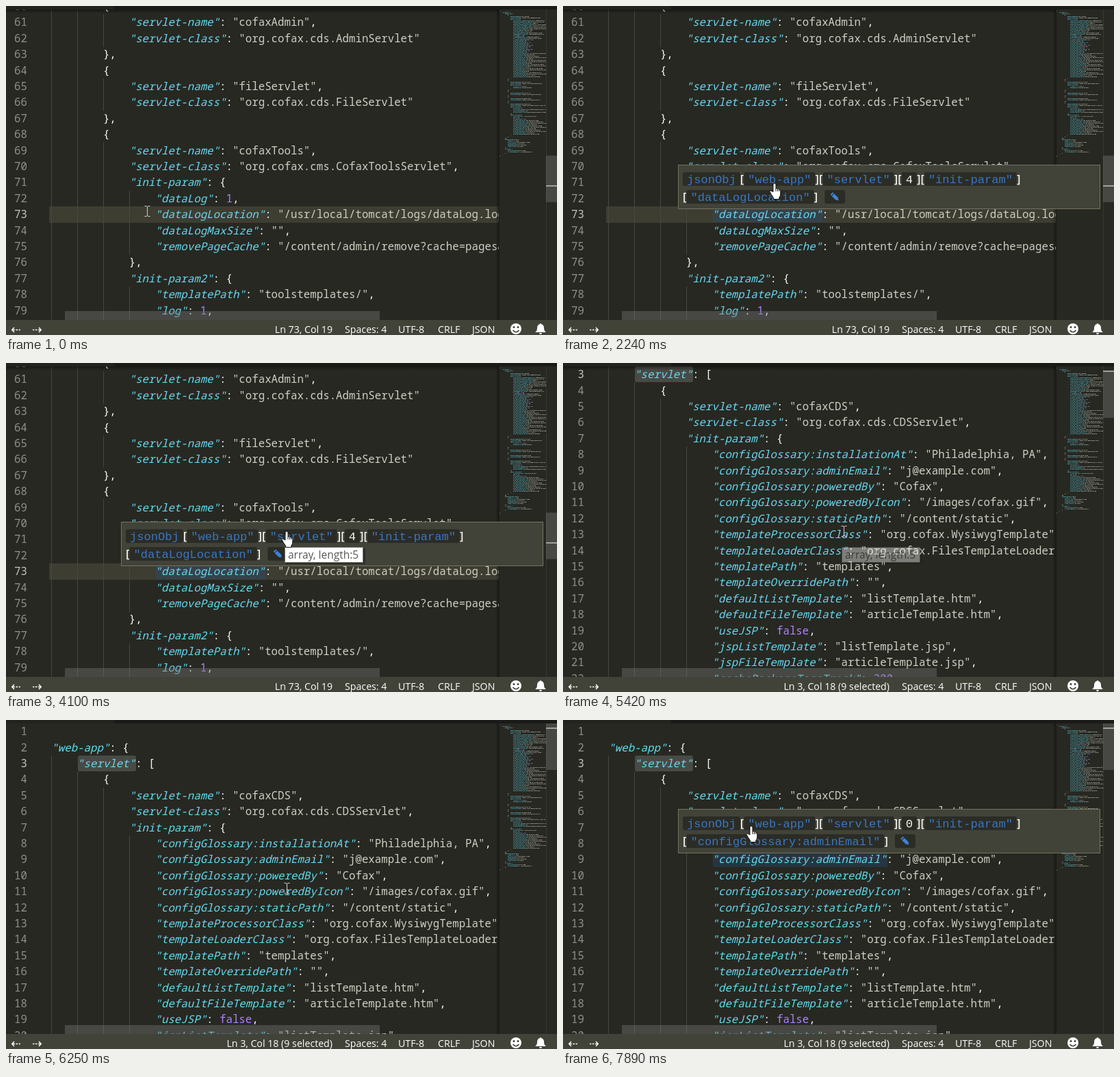
Recreate the animation shown at these times as an HTML page with a canvas. Size 805x481 px, loop 8 s.

```html
<!DOCTYPE html>
<html lang="en">
<head>
<meta charset="utf-8">
<title>JSON path hover</title>
<style>
html, body { margin: 0; width: 100%; height: 100%; overflow: hidden; background: #272822; }
canvas { display: block; }
</style>
</head>
<body>
<canvas id="stage" width="805" height="481"></canvas>
<script>
const stage = document.getElementById('stage').getContext('2d');
const layer = Object.assign(document.createElement('canvas'), { width: 805, height: 481 }).getContext('2d');
let ctx = stage;
const LOOP = 8000, CHAR = 9.45, ROW = 23.4, TOP = 5, BOTTOM = 459, LEFT = 28.5;
const MONO = '500 15.75px "Noto Sans Mono", monospace';
const UI = '"Open Sans", sans-serif';
const CODE = '17.1px "Liberation Mono", monospace';
const COLORS = { key: '#66d9ef', string: '#cfcfc2', number: '#ae81ff', mark: '#f8f8f2' };

// Each line starts with its indent level.
const head = `0{
1"web-app": {
2"servlet": [
3{
4"servlet-name": "cofaxCDS",
4"servlet-class": "org.cofax.cds.CDSServlet",
4"init-param": {
5"configGlossary:installationAt": "Philadelphia, PA",
5"configGlossary:adminEmail": "j@example.com",
5"configGlossary:poweredBy": "Cofax",
5"configGlossary:poweredByIcon": "/images/cofax.gif",
5"configGlossary:staticPath": "/content/static",
5"templateProcessorClass": "org.cofax.WysiwygTemplate",
5"templateLoaderClass": "org.cofax.FilesTemplateLoader",
5"templatePath": "templates",
5"templateOverridePath": "",
5"defaultListTemplate": "listTemplate.htm",
5"defaultFileTemplate": "articleTemplate.htm",
5"useJSP": false,
5"jspListTemplate": "listTemplate.jsp",
5"jspFileTemplate": "articleTemplate.jsp",
5"cachePackageTagsTrack": 200,`.split('\n');
const middle = `4}
3},
3{
4"servlet-name": "cofaxEmail",
4"servlet-class": "org.cofax.cds.EmailServlet",
4"init-param": {
5"mailHost": "mail1",
5"mailHostOverride": "mail2"
4}
3},
3{
4"servlet-name": "cofaxAdmin",
4"servlet-class": "org.cofax.cds.AdminServlet"
3},
3{
4"servlet-name": "fileServlet",
4"servlet-class": "org.cofax.cds.FileServlet"
3},
3{
4"servlet-name": "cofaxTools",
4"servlet-class": "org.cofax.cms.CofaxToolsServlet",
4"init-param": {
5"dataLog": 1,
5"dataLogLocation": "/usr/local/tomcat/logs/dataLog.log",
5"dataLogMaxSize": "",
5"removePageCache": "/content/admin/remove?cache=pages&id=",
4},
4"init-param2": {
5"templatePath": "toolstemplates/",
5"log": 1,`.split('\n');
const tail = `4}
3}
2],
2"servlet-mapping": {
3"cofaxCDS": "/",
3"cofaxEmail": "/aliases/mail/*",
3"cofaxAdmin": "/admin/*",
3"fileServlet": "/static/*",
3"cofaxTools": "/tools/*"
2},
2"taglib": {
3"taglib-uri": "cofax.tld",
3"taglib-location": "/tags/cofax.tld"
2}
1}
0}`.split('\n');
// Parameters that are only ever seen in the minimap.
const params = (count, plain) => Array.from({ length: count }, (_, i) =>
  `5"${'k'.repeat(12 + i * 7 % 11)}": ${i < plain ? 10 + i : `"${'v'.repeat(i * 11 % 34)}"`},`);
const lines = [...head, ...params(27, 9), ...middle, ...params(12, 1), ...tail].map(parse);

function parse(source) {
  let col = source[0] * 4;
  const line = { indent: +source[0], tokens: [] };
  for (const text of source.slice(1).match(/"[^"]*"|\w+|[^"\w]+/g)) {
    const next = source[1 + col - line.indent * 4 + text.length];
    const kind = text[0] === '"' ? (next === ':' ? 'key' : 'string') : /\w/.test(text) ? 'number' : 'mark';
    line.tokens.push({ text, col, kind });
    col += text.length;
  }
  return line;
}

const minimap = document.createElement('canvas');
minimap.width = 68;
minimap.height = 230;
{
  const m = minimap.getContext('2d');
  lines.forEach((line, i) => line.tokens.forEach(({ text, col, kind }) => {
    m.fillStyle = COLORS[kind];
    [...text].forEach((c, k) => {
      if (c === ' ') return;
      m.globalAlpha = 0.2 + (c.charCodeAt(0) * 7 + k * 13 + i * 5) % 10 * 0.05;
      m.fillRect(col + k, i * 2, 1, 1);
    });
  }));
}

const views = [
  { from: 0, scroll: 1396.7, line: 73, status: 'Ln 73, Col 19' },
  { from: 5420, scroll: 46.8, line: 3, status: 'Ln 3, Col 18 (9 selected)' },
  { from: 6250, scroll: 0, line: 3, status: 'Ln 3, Col 18 (9 selected)' }
];
const hovers = [
  { from: 1370, full: 1490, to: 5420, y: 232, line: 73, index: '4', key: '"dataLogLocation"' },
  { from: 5970, full: 5970, to: 6250, y: 177, line: 13, index: '0', key: '"templateProcessorClass"' },
  { from: 7260, full: 7390, to: 8000, y: 130, line: 9, index: '0', key: '"configGlossary:adminEmail"' }
];
const tips = [
  { x: 309, y: 277, w: 122, text: 'object, length:3', fade: [[2730, .35], [2860, .8], [2980, 1], [3490, .6], [3610, .3], [3730, 0]] },
  { x: 407, y: 269, w: 115, text: 'array, length:5', fade: [[3980, .4], [4100, 1], [5280, .75], [5420, .4], [5550, 0]] }
];
// time, x, y, 1 for the hand
const mouse = [
  [0, 206, 300], [260, 208, 300], [380, 216, 300], [500, 232, 300], [630, 252, 301], [750, 270, 301],
  [870, 284, 301], [1000, 288, 301], [1860, 289, 301], [2000, 298, 285, 1], [2120, 305, 271, 1],
  [2240, 309, 259, 1], [2360, 311, 255, 1], [2480, 311, 253, 1], [3230, 307, 251, 1], [3350, 332, 251, 1],
  [3490, 372, 249, 1], [3610, 402, 247, 1], [3730, 410, 246, 1], [5420, 410, 246], [6760, 396, 242],
  [6880, 340, 222], [7000, 320, 216], [7890, 275, 155, 1]
];
const last = (list, t) => list.filter(step => step[0] <= t).pop();

function rect(x, y, w, h, color, radius = 0) {
  ctx.fillStyle = color;
  ctx.beginPath();
  ctx.roundRect(x, y, w, h, radius);
  ctx.fill();
}
function write(text, x, y, color, font, align = 'left') {
  ctx.font = font;
  ctx.fillStyle = color;
  ctx.textAlign = align;
  ctx.fillText(text, x, y);
}
function stroke(path, color, width = 1) {
  ctx.strokeStyle = color;
  ctx.lineWidth = width;
  ctx.stroke(new Path2D(path));
}
function fill(path, color) {
  ctx.fillStyle = color;
  ctx.fill(new Path2D(path));
}
function at(x, y, draw) {
  ctx.save();
  ctx.translate(x, y);
  draw();
  ctx.restore();
}
function shadow(x0, y0, x1, y1, w, h) {
  const shade = ctx.createLinearGradient(x0, y0, x1, y1);
  shade.addColorStop(0, 'rgba(0,0,0,.4)');
  shade.addColorStop(1, 'rgba(0,0,0,0)');
  rect(Math.min(x0, x1), y0, w, h, shade);
}
// Draws a group as a whole with one opacity.
function faded(alpha, draw) {
  ctx = layer;
  ctx.clearRect(0, 0, 805, 481);
  draw();
  ctx = stage;
  ctx.globalAlpha = alpha;
  ctx.drawImage(layer.canvas, 0, 0);
  ctx.globalAlpha = 1;
}

function drawEditor(view, hover, t) {
  const middleOf = n => TOP + (n - 0.5) * ROW - view.scroll;
  const rowTop = n => Math.round(middleOf(n) - ROW / 2);
  ctx.save();
  ctx.beginPath();
  ctx.rect(0, TOP, 720, BOTTOM - TOP);
  ctx.clip();
  if (view.line === 73) rect(63, rowTop(73), 657, 24, '#3e3d32');
  else rect(105, rowTop(3), 85, 23, '#484a45', 3);
  if (hover) rect(219, rowTop(hover.line), hover.key.length * CHAR, 23, 'rgba(38,79,120,.36)');
  const first = Math.floor(view.scroll / ROW);
  for (let n = first + 1; n <= first + 21; n++) {
    const line = lines[n - 1], base = middleOf(n) + 5.4;
    for (let k = 1; k < line.indent; k++)
      rect(Math.round(LEFT + k * 4 * CHAR), rowTop(n), 1, 24, '#464741');
    write(n, 31, base, n === view.line ? '#c2c2bf' : '#90908a', MONO, 'right');
    for (const { text, col, kind } of line.tokens)
      if (col > 3) write(text, LEFT + col * CHAR, base, COLORS[kind], (kind === 'key' ? 'italic ' : '') + MONO);
  }
  // The caret toggles every half second.
  if (view.line === 73 && Math.floor((t + 150) / 500) % 2) rect(199, 297, 2, 20, '#f8f8f0');
  rect(86, 446, 460, 13, 'rgba(121,121,121,.4)');
  if (view.scroll) shadow(0, TOP, 0, TOP + 6, 720, 6);
  ctx.restore();

  shadow(721, TOP, 715, TOP, 6, BOTTOM - TOP);
  ctx.drawImage(minimap, 721, 7);
  const ratio = 0.153;
  rect(789, TOP, 1, BOTTOM - TOP, '#383932');
  rect(789, TOP + view.scroll * ratio, 16, 68, 'rgba(121,121,121,.4)');
  rect(789, Math.round(TOP + (view.line - 1) * ROW * ratio) - 1, 16, 2, '#a0a09b');
  rect(0, 0, 805, TOP, '#1a1b18');
  rect(0, 0, 158, TOP, '#22231e');
}

function drawStatus(view) {
  rect(0, BOTTOM, 805, 22, '#414339');
  const font = '500 14.2px ' + UI;
  write(view.status, 477, 478, '#fff', font, 'right');
  [['Spaces: 4', 495], ['UTF-8', 573], ['CRLF', 631], ['JSON', 681]].forEach(([text, x]) => write(text, x, 478, '#fff', font));
  for (const [x, flip] of [[8, 1], [52, -1]]) at(x, 473.5, () => {
    ctx.scale(flip, 1);
    stroke('M4-3.5L.7 0 4 3.5M1 0H5M6.5 0H9M10.5 0H13', '#fff', 1.4);
  });
  at(745, 472, () => {
    fill('M-8 0a8 8 0 1 0 16 0a8 8 0 1 0-16 0', '#fff');
    fill('M-4.5-2.5a1.5 1.5 0 1 0 3 0a1.5 1.5 0 1 0-3 0M1.5-2.5a1.5 1.5 0 1 0 3 0a1.5 1.5 0 1 0-3 0', '#414339');
    stroke('M-4.5 2Q0 7.5 4.5 2', '#414339', 1.6);
  });
  at(781, 472, () => fill('M-8 5Q-5 3-5-1Q-5-6-1-7a1 1 0 0 1 2 0Q5-6 5-1Q5 3 8 5ZM-2 6h4a2 2 0 0 1-4 0', '#fff'));
}

function drawHover({ y, index, key }) {
  rect(168, y, 617, 65, '#75715e');
  rect(169, y + 1, 615, 63, '#414339');
  const rows = [['jsonObj', '[', '"web-app"', '][', '"servlet"', '][', index, '][', '"init-param"', ']'], ['[', key, ']']];
  let x;
  rows.forEach((row, r) => {
    const mid = y + 21 + r * 26;
    x = 175;
    for (const text of row) {
      const bracket = /[[\]]/.test(text);
      ctx.font = bracket ? '600 16.5px ' + UI : CODE;
      const width = ctx.measureText(text).width, pad = bracket ? 0 : 6;
      if (!bracket) rect(x, mid - 10, width + 12, 20, '#2b2c26', 3);
      write(text, x + pad, mid + 5.5, bracket || text === index ? '#f8f8f2' : '#3a76c0', ctx.font);
      x += width + pad * 2;
    }
  });
  rect(x + 10, y + 37, 30, 20, '#2b2c26', 3);
  at(x + 25, y + 47, () => {
    ctx.rotate(Math.PI / 4);
    fill('M-7-2.5h2v5h-2zM-4-2.5h8L7.5 0 4 2.5h-8z', '#3f82d8');
  });
}

function drawTip({ x, y, w, text }) {
  rect(x + 2, y + 2, w + 1, 23, 'rgba(0,0,0,.3)');
  rect(x, y, w, 23, '#767676');
  rect(x + 1, y + 1, w - 2, 21, '#fff');
  write(text, x + 5, y + 17, '#575757', '15.5px ' + UI);
}

function drawMouse([, x, y, hand]) {
  at(x, y, () => {
    if (!hand) return stroke('M-3.5-7.5H-1L.5-6.5 2-7.5H4.5M.5-6.5V6.5M-3.5 7.5H-1L.5 6.5 2 7.5H4.5', '#d0d0cc');
    const shape = 'M-2 2a2 2 0 0 1 4 0v6q1.8-.8 2.5.7q1.7-.6 2.3.7q2-.2 2 1.8V16q0 3-2 5v2.5h-8V22q-1.5-3-3.5-5.5q-1-2.5-2.3-4q.8-2.2 3-1L-2 13z';
    fill(shape, '#fff');
    stroke(shape + 'M2 8v4M4.5 9v3M6.8 10v2', '#000', 0.9);
  });
}

function draw(t) {
  const view = views.filter(v => v.from <= t).pop();
  const hover = hovers.find(h => h.from <= t && t < h.to);
  rect(0, 0, 805, 481, '#272822');
  drawEditor(view, hover, t);
  drawStatus(view);
  if (hover) faded(t < hover.full ? 0.1 : 1, () => drawHover(hover));
  for (const tip of tips) {
    const step = last(tip.fade, t);
    if (step && step[1]) faded(step[1], () => drawTip(tip));
  }
  drawMouse(last(mouse, t));
}

const start = performance.now();
function tick() {
  draw((performance.now() - start) % LOOP);
  requestAnimationFrame(tick);
}
tick();
</script>
</body>
</html>
```
